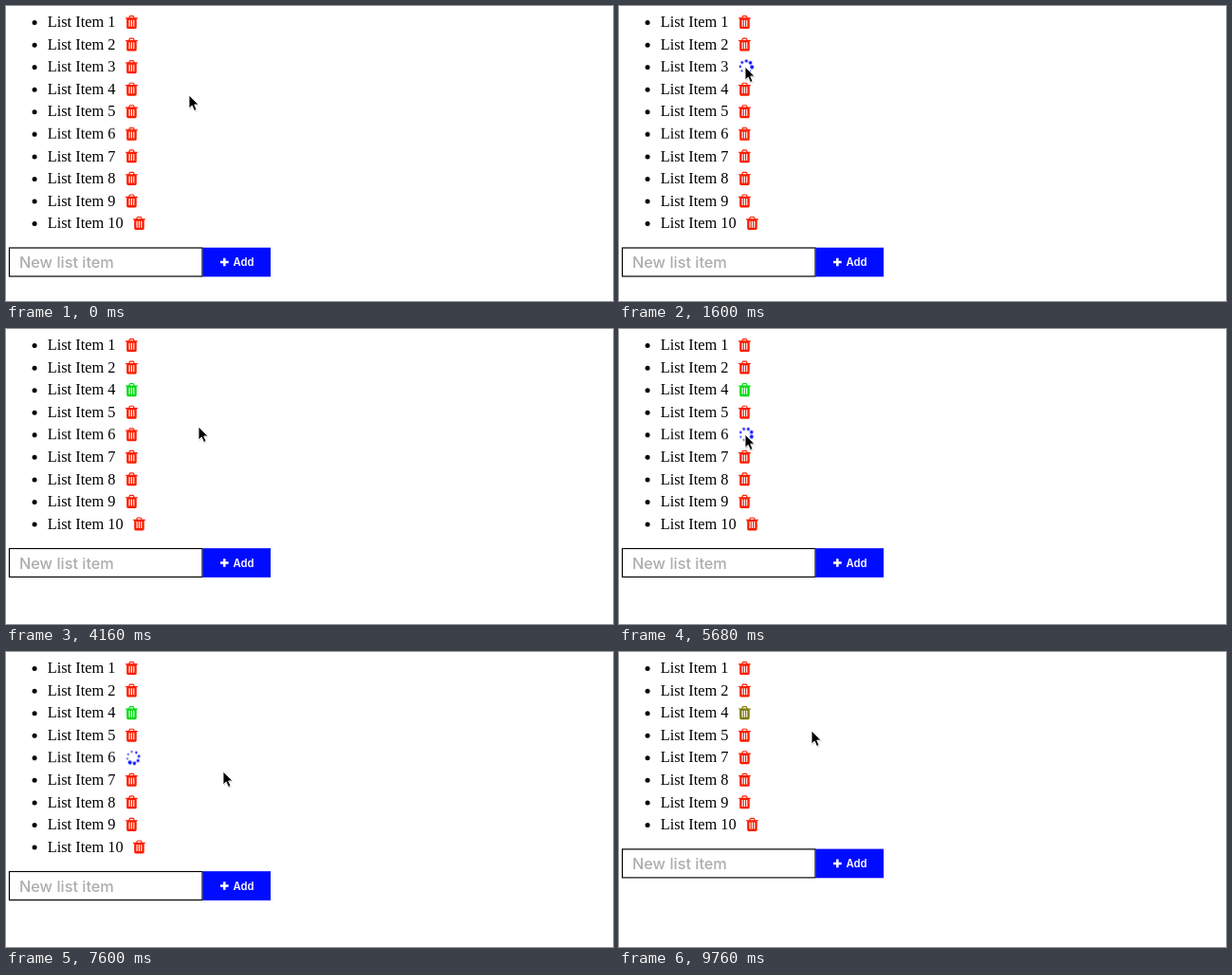
Animation of 640x311 px, one loop 9.84 s. Source, as an HTML page:

```html
<!DOCTYPE html>
<html lang="en">
<head>
<meta charset="utf-8">
<title>List with delayed delete</title>
<style>
  html, body { margin: 0; width: 100%; height: 100%; overflow: hidden; background: #fff; }
  svg { display: block; }
  .label { font: 16.35px "Liberation Serif", "Times New Roman", serif; }
  .hint { font: 500 16.3px Inter, "Open Sans", sans-serif; fill: #adadad; }
  .add { font: 600 11.2px Inter, "Open Sans", sans-serif; fill: #fff; }
  .bin { fill: #fb1c00; }
  .spin { fill: #000cff; opacity: 0; }
</style>
</head>
<body>
<svg width="640" height="311" viewBox="0 0 640 311">
  <defs>
    <path id="bin" fill-rule="evenodd" d="M0 2.25Q0 2 .25 2H2.67L3.2 .75Q3.5 0 4.2 0H6.8Q7.5 0 7.8 .75L8.33 2H10.75Q11 2 11 2.25V2.75Q11 3 10.75 3H10V10.4Q10 12 8.75 12H2.25Q1 12 1 10.4V3H.25Q0 3 0 2.75Z
      M3.75 2H7.25L6.85 1H4.15Z M3 4H4V10H3Z M5 4H6V10H5Z M7 4H8V10H7Z"/>
  </defs>
  <g id="list"></g>
  <g id="form">
    <rect x="3.5" y="255" width="203.5" height="30" fill="#fff" stroke="#000" stroke-width="1.2"/>
    <text class="hint" x="14" y="276.2">New list item</text>
    <rect x="207.5" y="254.7" width="71.5" height="30.7" fill="#000cff"/>
    <path d="M226 270H234.6M230.3 265.7V274.3" stroke="#fff" stroke-width="2.5"/>
    <text class="add" x="239.6" y="274.2">Add</text>
  </g>
  <g id="cursor">
    <path d="M.6 1.6V15.4L3.9 12.4 6.2 17.6 8.9 16.4 6.6 11.4H10.8Z" opacity=".16"/>
    <path d="M0 0V14L3.2 11 5.5 16.4 8 15.3 5.7 10H10.1Z" stroke="#fff" stroke-width=".9"/>
  </g>
</svg>
<script>
  const LOOP = 9840, DELAY = 2320, PITCH = 23.55, MID = 17;
  const RED = '#fb1c00', GREEN = '#00dc10';
  const HOME = { x: 193, y: 94 };
  const $ = id => document.getElementById(id);
  const move = (x, y) => `translate(${x}px, ${y}px)`;

  // The pointer stays on the bin until leave, goes to away, then drifts to rest.
  const jobs = [
    { item: 3, start: 1440, leave: 1760, away: { x: 242, y: 94 }, rest: { x: 203, y: 103 }, restAt: 4160 },
    { item: 6, start: 5440, leave: 7060, away: { x: 229, y: 126 }, rest: { x: 203, y: 83 }, restAt: 9760 }
  ];
  jobs.forEach((job, i) => {
    job.end = job.start + DELAY;
    job.y = MID + (job.item - 1 - i) * PITCH;
  });

  function add(parent, tag, attrs = {}, text = '') {
    const el = document.createElementNS('http://www.w3.org/2000/svg', tag);
    for (const key in attrs) el.setAttribute(key, attrs[key]);
    el.textContent = text;
    return parent.appendChild(el);
  }

  // Keys are [time, value]; the last value holds to the end of the loop.
  function play(el, prop, keys, easing = 'linear') {
    const [lastTime, lastValue] = keys[keys.length - 1];
    if (lastTime < LOOP) keys = [...keys, [LOOP, lastValue]];
    const frames = keys.map(([t, v]) => ({ offset: t / LOOP, [prop]: v, easing }));
    el.animate(frames, { duration: LOOP, iterations: Infinity });
  }

  const step = (el, prop, keys) => play(el, prop, keys, 'step-end');

  function shiftUp(el, above) {
    const shifts = above.map((job, i) => [job.end, move(0, -PITCH * (i + 1))]);
    step(el, 'transform', [[0, move(0, 0)], ...shifts]);
  }

  function addSpinner(row, x, job) {
    const holder = add(row, 'g', { class: 'spin', transform: `translate(${x + 8} ${MID})` });
    const wheel = add(holder, 'g');
    for (let i = 0; i < 8; i++) {
      const a = -i * Math.PI / 4;
      add(wheel, 'circle', {
        cx: 6.2 * Math.cos(a), cy: 6.2 * Math.sin(a), r: Math.max(0.9, 2 - i * 0.2)
      });
    }
    const turn = t => `rotate(${(t - job.start) * 0.24 - 36}deg)`;
    play(wheel, 'transform', [[0, turn(0)], [LOOP, turn(LOOP)]]);
    step(holder, 'opacity', [[0, 0], [job.start, 1], [job.end, 0]]);
  }

  function addItem(n) {
    const slot = add($('list'), 'g', { transform: `translate(0 ${(n - 1) * PITCH})` });
    const row = add(slot, 'g');
    const x = n < 10 ? 126 : 134;
    add(row, 'circle', { cx: 30.1, cy: 17.6, r: 2.5 });
    add(row, 'text', { class: 'label', x: 43.7, y: 22.3 }, 'List Item ' + n);
    const bin = add(row, 'use', {
      href: '#bin', class: 'bin', transform: `translate(${x} 10) scale(1.17)`
    });

    const job = jobs.find(j => j.item === n);
    if (job) {
      addSpinner(row, x, job);
      step(bin, 'opacity', [[0, 1], [job.start, 0]]);
      step(row, 'opacity', [[0, 1], [job.end, 0]]);
    }
    // The item that moves up first stays green, then fades back.
    if (n === jobs[0].item + 1) {
      const { end } = jobs[0];
      play(bin, 'fill', [[0, RED], [end - 0.1, RED], [end, GREEN], [LOOP - 160, GREEN], [LOOP, RED]]);
    }
    shiftUp(row, jobs.filter(j => j.item < n));
  }

  for (let n = 1; n <= 10; n++) addItem(n);
  shiftUp($('form'), jobs);

  const at = (t, { x, y }) => [t, move(x, y)];
  const path = [at(0, HOME)];
  for (const job of jobs) {
    const bin = { x: 133, y: job.y };
    path.push(
      at(job.start - 80, bin), at(job.leave, bin),
      at(job.leave + 400, job.away), at(job.restAt, job.rest)
    );
  }
  path.push(at(LOOP, HOME));
  // Drifting starts late, so the pointer lingers where it arrived.
  play($('cursor'), 'transform', path, 'cubic-bezier(.7, 0, .4, 1)');
</script>
</body>
</html>
```
